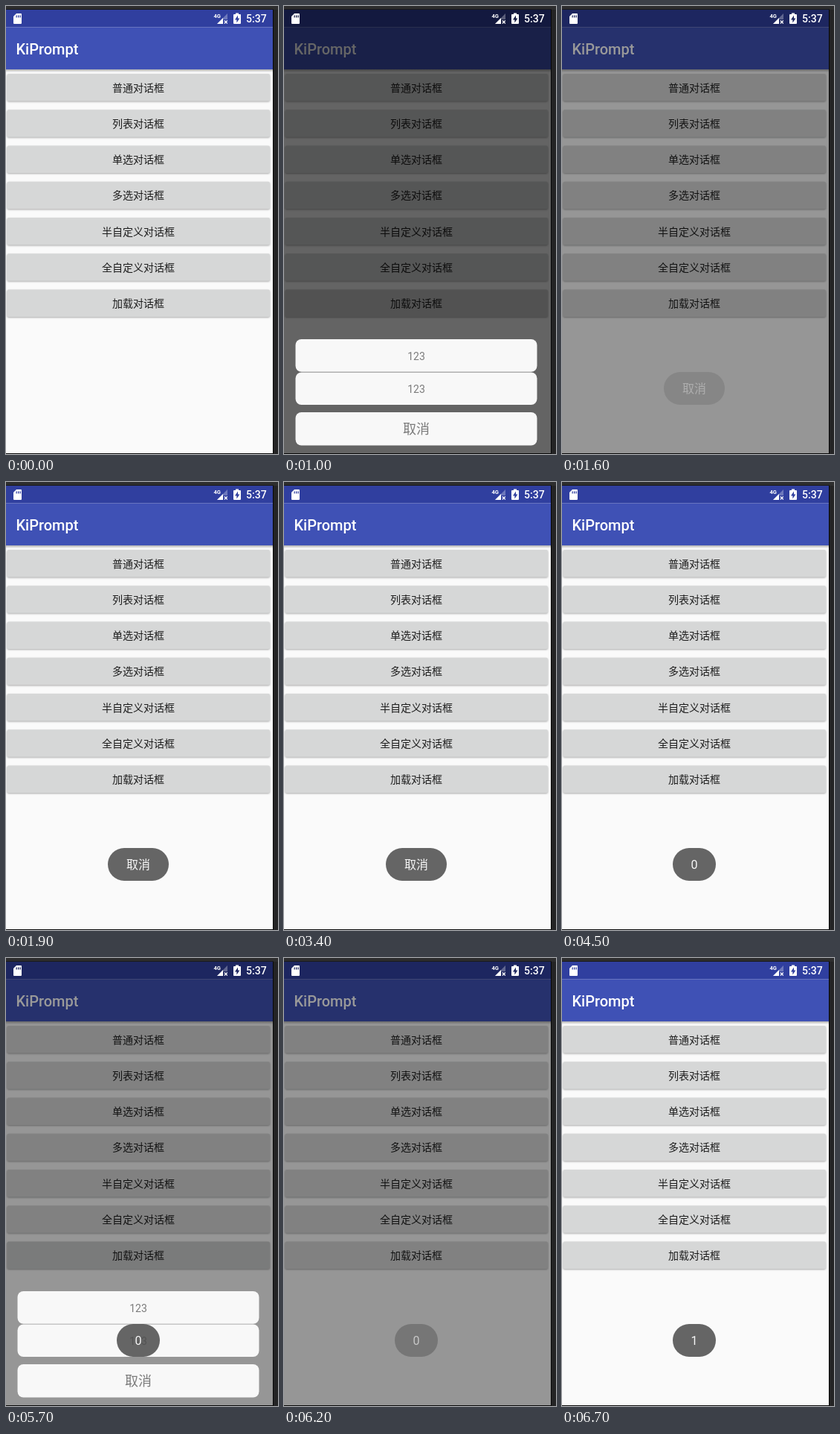
Animation, 366 px wide and 601 px high, one loop 7300 ms. Source, as an HTML page:

```html
<!DOCTYPE html>
<html lang="zh-CN">
<head>
<meta charset="utf-8">
<style>
  html, body { margin: 0; width: 100%; height: 100%; overflow: hidden; background: #242425; }
  svg { display: block; width: 366px; height: 601px; }
  text { font-family: Roboto, "Noto Sans CJK SC", "Noto Sans CJK", sans-serif; font-size: 14px; }
  .mid { text-anchor: middle; }
  #buttons { filter: drop-shadow(0 1px 1px rgba(0, 0, 0, .32)); }
</style>
</head>
<body>
<svg viewBox="0 0 366 601">
  <defs>
    <linearGradient id="shade" x2="0" y2="1">
      <stop stop-color="#000" stop-opacity=".3"/>
      <stop offset="1" stop-color="#000" stop-opacity="0"/>
    </linearGradient>
  </defs>
  <rect width="366" height="5" fill="#2d2d2e"/>
  <path d="M0 4.5H360V601H0z" fill="#080808"/>
  <path d="M0 5H359V600H0z" fill="#fafafa"/>
  <path d="M0 5H359V28.5H0z" fill="#303f9f"/>
  <path d="M0 28.5H359V85H0z" fill="#3f51b5"/>
  <rect y="85" width="359" height="4" fill="url(#shade)"/>
  <text x="13.5" y="65" fill="#fff" style="font-size:20px;font-weight:500">KiPrompt</text>
  <g id="buttons"></g>
  <rect id="ripple" x="1.5" y="380.5" width="353.5" height="36.5" rx="2"/>
  <g id="labels" class="mid" fill="#1d1d1d"></g>
  <path id="dim" d="M0 5H359V600H0z"/>

  <g fill="#fff">
    <path fill-rule="evenodd" d="M14 10h6q1 0 1 1v12q0 1-1 1h-9q-1 0-1-1V14zM13.5 12.5v3h1.3v-3zM16 12.5v3h1.3v-3zM18.5 12.5v3h1.3v-3z"/>
    <text x="279.5" y="16" style="font-size:7.5px;font-weight:700">4G</text>
    <path d="M298 10V18H292V24H284z" opacity=".3"/>
    <path d="M292 16V24H284z"/>
    <path d="M293.8 19.5l4 4m0-4l-4 4" stroke="#fff" stroke-width="1.2"/>
    <path fill-rule="evenodd" d="M309 9.5h4v1.5h2q1 0 1 1v11q0 1-1 1h-8q-1 0-1-1V12q0-1 1-1h2zM312 12.5l-4 6h2.4v4l4-6H312z"/>
    <text x="323" y="22" style="font-weight:500">5:37</text>
  </g>

  <g id="dialog" class="mid" fill="#7b7b7b">
    <g fill="#f8f8f8">
      <rect x="15.5" y="447" width="325" height="43.8" rx="8"/>
      <rect x="15.5" y="491.4" width="325" height="43.6" rx="8"/>
      <rect x="15.5" y="545" width="325" height="44.5" rx="8"/>
    </g>
    <text x="178" y="475">123</text>
    <text x="178" y="519">123</text>
    <text x="178" y="574" style="font-size:18px">取消</text>
  </g>
  <g id="toast" class="mid">
    <rect id="pill" y="491" height="44" rx="22" fill="#4c4c4c" fill-opacity=".85"/>
    <text id="message" x="178" y="519" fill="#f6f6f6" style="font-size:16px"></text>
  </g>
</svg>
<script>
const $ = id => document.getElementById(id);
const LOOP = 7300, STEP = 100;

["普通", "列表", "单选", "多选", "半自定义", "全自定义", "加载"].forEach((name, i) => {
  const y = 91 + i * 48.25;
  $("buttons").innerHTML += `<rect x="1.5" y="${y}" width="353.5" height="36.5" rx="2" fill="#d6d7d7"/>`;
  $("labels").innerHTML += `<text x="178" y="${y + 23.5}">${name}对话框</text>`;
});

// Button press and dialog dismissal times
const visits = [[700, 1500], [3400, 4100], [5500, 6100]];
// Message, fade-in start and end, fade-out start and end, pill width
const toasts = [
  ["取消", 1500, 1900, 3500, 3800, 82],
  ["0", 4100, 4500, 6100, 6300, 58],
  ["1", 6300, 6700, LOOP, LOOP + 1, 58]
];

const ramp = (t, a, b) => Math.min(1, Math.max(0, (t - a) / (b - a)));

function draw(t) {
  let dim = 0, dialog = 0, ripple = 0;
  for (const [open, close] of visits) {
    dim += ramp(t, open, open + 300) - ramp(t, close, close + 300);
    if (t < close) dialog += ramp(t, open, open + 200);
    if (t >= open) ripple += .01 + .06 * ramp(t, open, open + 200) - .07 * ramp(t, open + 200, open + 400);
    if (t >= open + 400) ripple -= .01;
  }
  $("dim").setAttribute("opacity", .6 * dim);
  $("dialog").setAttribute("opacity", dialog);
  $("ripple").setAttribute("opacity", Math.max(0, ripple));

  const toast = toasts.find(([, start, , , end]) => t >= start && t < end);
  $("toast").setAttribute("opacity", toast ? ramp(t, toast[1], toast[2]) - ramp(t, toast[3], toast[4]) : 0);
  if (toast) {
    $("message").textContent = toast[0];
    $("pill").setAttribute("x", 178 - toast[5] / 2);
    $("pill").setAttribute("width", toast[5]);
  }
}

const begin = performance.now();
function tick() {
  const t = (performance.now() - begin) % LOOP;
  draw(Math.floor(t / STEP) * STEP);
  requestAnimationFrame(tick);
}
tick();
</script>
</body>
</html>
```
